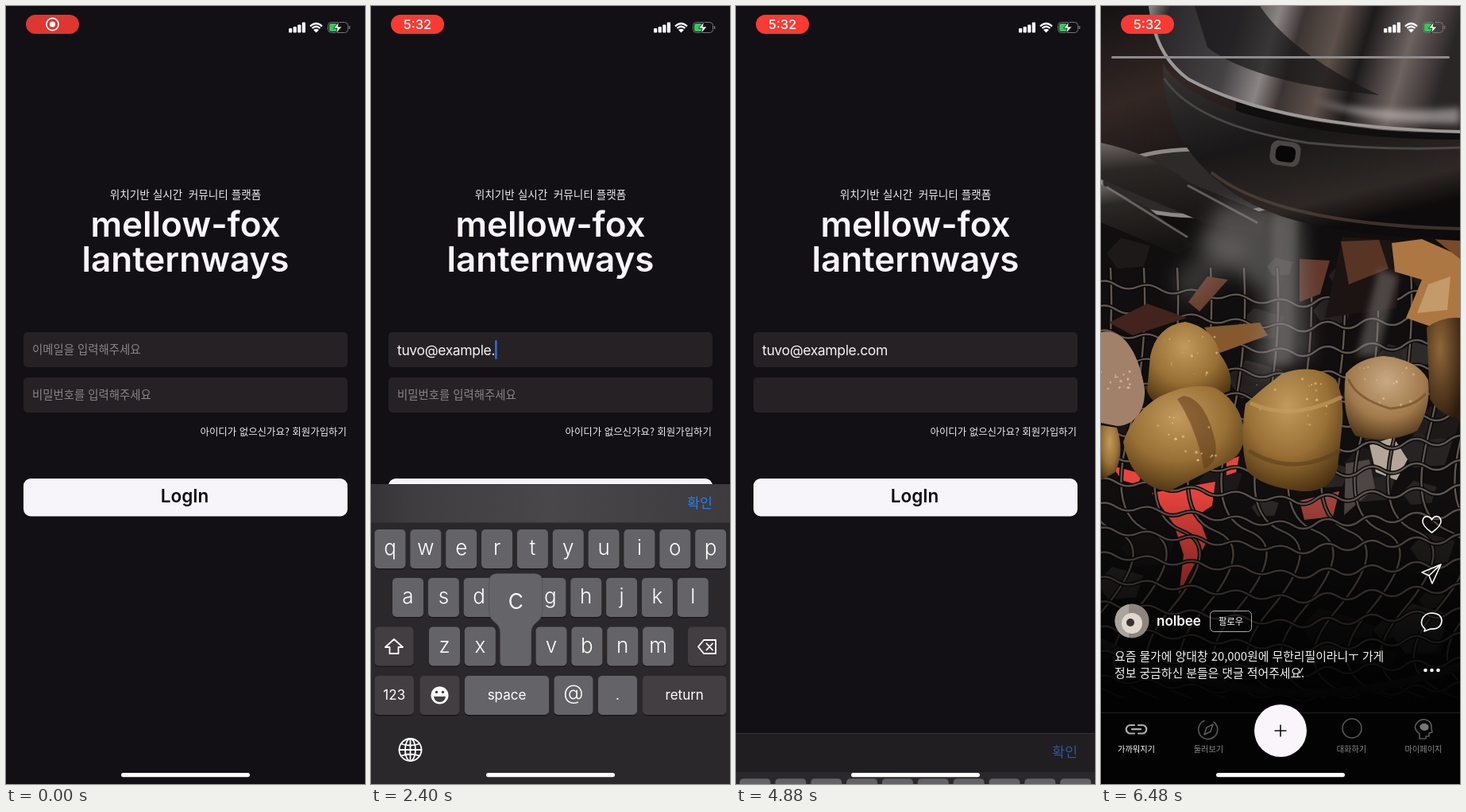
An HTML page that plays this animation: 452 by 978 pixels, repeating every 6560 ms.

```html
<!DOCTYPE html>
<html lang="ko">
<head>
<meta charset="utf-8">
<title>Login flow</title>
<style>
html, body { margin: 0; width: 100%; height: 100%; overflow: hidden; background: #121014; }
svg { display: block; width: 452px; height: 978px; }
text { font-family: Inter, "Noto Sans CJK KR", "Noto Sans CJK", sans-serif; white-space: pre; }
.ko { font-family: "Noto Sans CJK KR", "Noto Sans CJK", sans-serif; }
.mid { text-anchor: middle; }
.line { fill: none; stroke-linecap: round; stroke-linejoin: round; }
.hint { font-size: 14.4px; font-weight: 300; fill: #8a8588; }
.mail { font-size: 17.5px; letter-spacing: -.02em; fill: #f6f3f7; }
.key { font-size: 26px; font-weight: 300; fill: #fff; }
.word { font-size: 17px; fill: #fff; }
.tab { font-size: 10.2px; fill: #8b888a; }

#pill { animation: pulse 2800ms 196ms ease-in-out infinite backwards; animation-delay: -2604ms; }
#board { animation: slide 6560ms infinite; }
#glow { animation: glow 6560ms linear infinite; }
#done { animation: done 6560ms linear infinite; }
#feed { animation: feed 6560ms infinite; }
#plus { animation: settle 6560ms infinite; }
#rec { animation: rec 6560ms linear infinite; }
#clock { animation: clock 6560ms linear infinite; }
@keyframes pulse {
  0%, 100% { fill: #d4352f; }
  7% { fill: #dd3731; }
  20%, 80% { fill: #fa3a32; }
  50% { fill: #ff3b33; }
}
@keyframes slide {
  0%, 11.418% { transform: translateY(377px); animation-timing-function: cubic-bezier(.38,.7,.125,1); }
  19.04% { transform: none; }
  71.646% { transform: none; animation-timing-function: cubic-bezier(.38,.7,.125,1); }
  79.27%, 100% { transform: translateY(377px); }
}
@keyframes glow { 0%, 14.63% { opacity: 0; } 18%, 71.646% { opacity: 1; } 72.9%, 100% { opacity: 0; } }
@keyframes done { 0%, 14.63% { opacity: .65; } 18%, 71.646% { opacity: 1; } 73.5%, 100% { opacity: .65; } }
@keyframes feed { 0%, 87.8% { opacity: 0; animation-timing-function: ease; } 93.14%, 100% { opacity: 1; } }
@keyframes settle { 0%, 91.47% { transform: translateY(2px); } 93.9%, 100% { transform: none; } }
@keyframes rec { 0%, 24% { opacity: 1; } 27%, 100% { opacity: 0; } }
@keyframes clock { 0%, 24% { opacity: 0; } 27%, 100% { opacity: 1; } }
</style>
</head>
<body>
<svg viewBox="0 0 452 978" xmlns="http://www.w3.org/2000/svg">
<defs>
  <linearGradient id="barGlow">
    <stop offset="0" stop-color="#353336"/><stop offset=".12" stop-color="#3f3d40"/>
    <stop offset=".5" stop-color="#49474a"/><stop offset="1" stop-color="#3d3b3e"/>
  </linearGradient>
  <linearGradient id="dome" x2="1" y2=".12">
    <stop offset="0" stop-color="#8e8b8b"/><stop offset=".07" stop-color="#2a282a"/>
    <stop offset=".3" stop-color="#454244"/><stop offset=".42" stop-color="#8b8484"/>
    <stop offset=".5" stop-color="#3c3533"/><stop offset=".62" stop-color="#5e514b"/>
    <stop offset=".72" stop-color="#1d1a1a"/><stop offset=".86" stop-color="#6d6360"/>
    <stop offset="1" stop-color="#2a2626"/>
  </linearGradient>
  <linearGradient id="band" x2=".4" y2="1">
    <stop offset="0" stop-color="#373434"/><stop offset=".5" stop-color="#191717"/>
    <stop offset=".85" stop-color="#2e2825"/><stop offset="1" stop-color="#0d0b0b"/>
  </linearGradient>
  <linearGradient id="wall" x2=".3" y2="1">
    <stop offset="0" stop-color="#151213"/><stop offset=".6" stop-color="#332724"/><stop offset="1" stop-color="#1d1817"/>
  </linearGradient>
  <linearGradient id="tong" x2=".2" y2="1">
    <stop offset="0" stop-color="#6d6763"/><stop offset=".3" stop-color="#2b2725"/><stop offset="1" stop-color="#151212"/>
  </linearGradient>
  <linearGradient id="shade" x2="0" y2="1">
    <stop offset="0" stop-color="#000" stop-opacity="0"/><stop offset=".65" stop-color="#000" stop-opacity=".72"/><stop offset="1" stop-color="#020202"/>
  </linearGradient>
  <radialGradient id="gold" cx=".45" cy=".3" r=".75">
    <stop offset="0" stop-color="#c29a5c"/><stop offset=".55" stop-color="#986f35"/><stop offset="1" stop-color="#49300f"/>
  </radialGradient>
  <radialGradient id="pale" cx=".5" cy=".3" r=".75">
    <stop offset="0" stop-color="#c9a983"/><stop offset=".6" stop-color="#a17a4c"/><stop offset="1" stop-color="#4d3319"/>
  </radialGradient>
  <radialGradient id="brown" cx=".4" cy=".3" r=".8">
    <stop offset="0" stop-color="#8f6737"/><stop offset="1" stop-color="#2b1a0d"/>
  </radialGradient>
  <filter id="soft" x="-50%" y="-50%" width="200%" height="200%"><feGaussianBlur stdDeviation="12"/></filter>
  <filter id="haze" x="-50%" y="-50%" width="200%" height="200%"><feGaussianBlur stdDeviation="4"/></filter>
  <clipPath id="face"><circle cx="39" cy="773" r="21.5"/></clipPath>
</defs>

<g id="login">
  <rect width="452" height="978" fill="#121014"/>
  <text class="ko mid" x="226" y="242" font-size="13.6" fill="#eeeaf0">위치기반 실시간  커뮤니티 플랫폼</text>
  <g class="mid" font-size="44" font-weight="600" fill="#f9f5fb">
    <text x="226" y="290">mellow-fox</text>
    <text x="226" y="334">lanternways</text>
  </g>
  <g fill="#252124">
    <rect x="22" y="410" width="408" height="44" rx="5"/>
    <rect x="22" y="467" width="408" height="44" rx="5"/>
  </g>
  <text class="ko hint" id="mailHint" x="33" y="437">이메일을 입력해주세요</text>
  <text class="ko hint" id="passHint" x="33" y="494">비밀번호를 입력해주세요</text>
  <g id="typing"></g>
  <text class="ko" x="429" y="539.5" font-size="12.45" fill="#eeeaf0" text-anchor="end">아이디가 없으신가요? 회원가입하기</text>
  <rect x="22" y="594" width="408" height="47.5" rx="9" fill="#f8f5fa"/>
  <text class="mid" x="225" y="624" font-size="22.5" font-weight="600" fill="#0c0a0e">LogIn</text>
</g>

<g id="board">
  <g id="keys"><rect y="649" width="452" height="340" fill="#2a282b"/></g>
  <rect y="601" width="452" height="48.5" fill="#201e20"/>
  <rect id="glow" y="601" width="452" height="48.5" fill="url(#barGlow)"/>
  <path d="M0 601.5H452" stroke="#3a383b" stroke-width=".8"/>
  <text class="ko" id="done" x="398" y="631" font-size="17.4" fill="#2b7ee6">확인</text>
  <g id="pops"></g>
</g>

<g id="feed">
  <rect width="452" height="978" fill="#100e0e"/>
  <rect width="170" height="200" fill="url(#wall)"/>
  <ellipse cx="125" cy="222" rx="125" ry="42" fill="#2e2a29" stroke="#8d8885" stroke-width="5"/>
  <g id="coals"></g>
  <g fill="#e8433c">
    <path d="M14 578L52 588L46 602L26 596Z"/>
    <path d="M64 612L144 598L140 628L122 640L134 672L112 712L98 740L104 690L92 652Z"/>
    <path d="M158 572L174 566L170 586L158 590Z"/>
    <path d="M250 622L300 610L292 642L256 646Z" fill="#a8453d"/>
  </g>
  <path d="M338 552L368 542L386 570L372 596L346 586Z" fill="#b3a698"/>
  <path d="M308 575L338 570L345 606L306 640Z" fill="#4d4644"/>
  <g id="mesh" class="line"></g>
  <path d="M282 392L304 290L380 296L372 380Z" fill="#1c1412"/>
  <path d="M302 296L350 294L362 330L312 350Z" fill="#583425"/>
  <path d="M110 372L134 340L160 344L124 384Z" fill="#693c2b"/>
  <path d="M10 398L58 374L108 392L40 414Z" fill="#42231d"/>
  <path d="M250 318L288 320L276 362L250 372Z" fill="#61382a"/>
  <path d="M366 298L404 293L452 314V398L418 404L384 392L404 344L370 334Z" fill="#ad7743"/>
  <path d="M412 350L440 340L436 382L398 386Z" fill="#c49a69"/>
  <path d="M420 293H452V318Z" fill="#794a25"/>
  <path d="M130 404L200 398L210 414L150 436Z" fill="#85592d"/>
  <path d="M0 410C28 404 48 436 55 482C56 514 38 528 20 528L0 524Z" fill="#a3806a"/>
  <path d="M0 527L20 530Q30 560 18 586L0 596Z" fill="url(#gold)"/>
  <path d="M62 440Q70 402 106 397Q142 404 150 438Q168 462 162 484L104 504Q66 508 58 484Z" fill="url(#gold)"/>
  <path d="M28 548Q40 512 72 492Q112 472 144 480Q176 498 180 534Q182 566 154 576Q120 592 86 610Q40 606 28 548Z" fill="url(#gold)"/>
  <path d="M104 490Q132 494 144 548Q148 574 130 582Q120 530 96 494Z" fill="#5d3518" opacity=".5"/>
  <path d="M182 500Q204 480 228 462Q270 448 296 470Q306 490 304 524L298 580Q290 612 252 610Q200 604 184 584Q174 546 182 500Z" fill="url(#gold)"/>
  <path d="M190 500Q240 522 302 492" class="line" stroke="#c5a15f" stroke-width="5" opacity=".6"/>
  <path d="M188 560Q240 592 300 560" class="line" stroke="#5a3d1b" stroke-width="5" opacity=".55"/>
  <path d="M308 462Q326 442 356 440Q398 444 412 470Q416 504 398 534Q360 552 320 540Q302 514 308 462Z" fill="url(#pale)"/>
  <path d="M312 470Q322 494 364 506Q394 504 408 488" class="line" stroke="#735029" stroke-width="3" opacity=".7"/>
  <path d="M410 404Q430 390 452 392V520Q426 514 414 494Z" fill="url(#brown)"/>
  <g id="gleam" fill="#f0d9a8"></g>
  <path d="M0 172Q60 184 112 222L208 262L200 288L130 272L0 218Z" fill="url(#tong)"/>
  <path d="M0 224L60 254L116 300L96 312L0 272Z" fill="url(#tong)"/>
  <path d="M8 228L108 290M110 226L196 272" class="line" stroke="#8e8783" stroke-width="3" opacity=".6"/>
  <g fill="#908b8b">
    <path d="M150 250H250L262 440L194 470L206 360L120 300Z" opacity=".48" filter="url(#soft)"/>
    <path d="M216 260L248 262L240 450L212 450Z" opacity=".28" filter="url(#haze)"/>
    <path d="M350 330L374 340L348 440L322 440Z" opacity=".42" filter="url(#haze)"/>
    <path d="M90 340L150 290L190 300L110 380Z" opacity=".3" filter="url(#soft)"/>
  </g>
  <path d="M78 72C110 130 260 168 452 168V295C330 290 230 278 168 236C112 196 78 150 78 72Z" fill="url(#band)"/>
  <path d="M60 0H452V160C300 160 160 130 96 84Q66 56 60 0Z" fill="url(#dome)"/>
  <path d="M118 0H200Q240 60 350 112Q190 96 134 52Z" fill="#171617" opacity=".7"/>
  <path d="M266 118Q350 138 452 128V148Q340 150 266 118Z" fill="#d0cbc8" opacity=".55" filter="url(#haze)"/>
  <path d="M64 18Q74 66 110 92Q220 152 452 158" class="line" stroke="#9d9997" stroke-width="4"/>
  <path d="M80 92Q120 150 260 172Q360 182 452 178" class="line" stroke="#4a4646" stroke-width="3"/>
  <path d="M140 210Q220 274 452 280" class="line" stroke="#5c4b40" stroke-width="4" opacity=".6"/>
  <rect x="213" y="170" width="38" height="31" rx="10" fill="#4a4645" transform="rotate(8 232 185)"/>
  <rect x="220" y="176" width="25" height="20" rx="7" fill="#080707" transform="rotate(8 232 185)"/>
  <path d="M0 800Q220 910 452 830" class="line" stroke="#2c2828" stroke-width="10"/>
  <rect y="610" width="452" height="278" fill="url(#shade)"/>
  <rect y="887" width="452" height="91" fill="#030303"/>
  <path d="M0 888.5H452" stroke="#1d1b1c" stroke-width="1.5"/>
  <rect x="13" y="63" width="426" height="3" rx="1.5" fill="#8d8a8d"/>

  <g class="line" stroke="#fff" stroke-width="1.6">
    <path d="M416.500 662Q404 653 405 647C406 640 414 640 416.500 646C419 640 427 640 428 647Q429 653 416.500 662Z"/>
    <path d="M428 702L404 712L413 716L417 726ZM428 702L413 716"/>
    <path d="M408 783Q402 778 404 772Q407 763 417 763Q429 764 429 773Q428 784 415 783L407 786Z"/>
  </g>
  <g fill="#fff"><circle cx="408.500" cy="835" r="2.3"/><circle cx="416.500" cy="835" r="2.3"/><circle cx="424.500" cy="835" r="2.3"/></g>
  <g clip-path="url(#face)">
    <rect x="17" y="751" width="44" height="44" fill="#8d857e"/>
    <rect x="17" y="751" width="18" height="44" fill="#aaa49e"/>
    <circle cx="39" cy="776" r="13" fill="#e0d8ce"/>
    <circle cx="37" cy="775" r="5" fill="#3a3230"/>
  </g>
  <text x="70" y="779" font-size="17" font-weight="600" fill="#fff">nolbee</text>
  <rect x="137.500" y="760.500" width="52" height="26" rx="5" fill="none" stroke="#aaa6a8"/>
  <text class="ko mid" x="163.500" y="777.500" font-size="11.3" font-weight="500" fill="#fff">팔로우</text>
  <g font-size="14.85" fill="#f4f2f4">
    <text class="ko" x="17" y="823">요즘 물가에 양대창 20,000원에 무한리필이라니ㅜ 가게</text>
    <text class="ko" x="17" y="844">정보 궁금하신 분들은 댓글 적어주세요.</text>
  </g>
  <path d="M250 839L254 832" stroke="#f4f2f4" stroke-width="1.2"/>

  <g class="line" stroke="#b0adaf" stroke-width="2.2">
    <path d="M42 904H37A5 5 0 0 0 37 914.500H42M47 904H52A5 5 0 0 1 52 914.500H47M39 909.200H50"/>
  </g>
  <g class="line" stroke="#5b585a" stroke-width="1.6">
    <path d="M142 900A12 12 0 1 1 130 898.500M141 903L138 912L130 916L133 907Z"/>
    <circle cx="316" cy="908" r="12"/>
    <path d="M401 921V915Q394 910 396 904Q400 896 408 897Q417 899 416 908L417 913L413 914V918H409V921Z"/>
  </g>
  <path d="M401 905Q406 899 412 904Q414 910 408 911Q402 911 401 905Z" fill="#777476"/>
  <text class="ko mid tab" x="44.500" y="938" style="fill:#fff">가까워지기</text>
  <text class="ko mid tab" x="135.500" y="938">둘러보기</text>
  <text class="ko mid tab" x="315.500" y="938">대화하기</text>
  <text class="ko mid tab" x="406" y="938">마이페이지</text>
  <g id="plus">
    <circle cx="226" cy="911" r="33" fill="#f9f5fb"/>
    <path d="M218.500 911H233.500M226 903.500V918.500" stroke="#111" stroke-width="1.6"/>
  </g>
</g>

<g id="status">
  <rect id="pill" x="25" y="11" width="67" height="24" rx="12"/>
  <g id="rec">
    <circle cx="58.500" cy="23" r="7.6" fill="none" stroke="#fff" stroke-width="1.6"/>
    <circle cx="58.500" cy="23" r="3.6" fill="#fff"/>
  </g>
  <text id="clock" class="mid" x="58.500" y="29" font-size="16.5" font-weight="500" fill="#fff">5:32</text>
  <g fill="#fff">
    <rect x="356" y="28" width="4.200" height="5.500" rx="1"/><rect x="361.600" y="26" width="4.200" height="7.500" rx="1"/>
    <rect x="367.200" y="23.500" width="4.200" height="10" rx="1"/><rect x="372.800" y="20.500" width="4.200" height="13" rx="1"/>
    <path d="M390.500 33.500L387 30Q390.500 27.500 394 30Z"/>
  </g>
  <path d="M383 25.500Q390.500 18.500 398 25.500M385.500 28Q390.500 23.500 395.500 28" fill="none" stroke="#fff" stroke-width="2.300"/>
  <rect x="405.500" y="20.500" width="25" height="13" rx="4" fill="none" stroke="#777479"/>
  <path d="M432.500 25V29" stroke="#777479" stroke-width="1.500"/>
  <rect x="407" y="22" width="10" height="10" rx="2.500" fill="#34c759"/>
  <path d="M419.500 19.500L412.500 28H417L415.500 34.500L423 26H418Z" fill="#fff" stroke="#121014" stroke-width=".8"/>
</g>
<rect x="145" y="964" width="162" height="5.200" rx="2.600" fill="#fff"/>
</svg>

<script>
const LOOP = 6560, MAIL = 'tuvo@example.com';
const TYPE_AT = 1290, STEP = 84, HOLD = 60, FOCUS = 880, LEAVE = 2960, SECURE = 3000, CLOSE = 4700;
const $ = id => document.getElementById(id);
const sheet = document.head.appendChild(document.createElement('style'));
let count = 0;

function add(parent, markup) {
  parent.insertAdjacentHTML('beforeend', markup);
  return parent.lastElementChild;
}

// Shows a node only inside the given [from, to] spans of the loop.
function show(node, ...spans) {
  const name = 'on' + count++;
  const pct = ms => (ms / LOOP * 100).toFixed(3) + '%';
  const steps = spans.map(([a, b]) =>
    `${pct(a)}{visibility:visible}` + (b < LOOP ? `${pct(b)}{visibility:hidden}` : ''));
  const start = spans[0][0] ? '0%{visibility:hidden}' : '';
  const end = spans.at(-1)[1] < LOOP ? 'hidden' : 'visible';
  sheet.append(`@keyframes ${name}{${start}${steps.join('')}to{visibility:${end}}}`);
  node.style.animation = `${name} ${LOOP}ms step-end infinite`;
}

// Keyboard
const keys = $('keys'), places = {};
const cap = (x, y, w, fill) =>
  `<rect x="${x}" y="${y + 1.5}" width="${w}" height="49" rx="5" fill="#1a181b"/>` +
  `<rect x="${x}" y="${y}" width="${w}" height="49" rx="5" fill="${fill}"/>`;
const label = (x, y, text, type) => `<text class="mid ${type}" x="${x}" y="${y}">${text}</text>`;
const LIGHT = '#646367', DARK = '#423e41';

[['qwertyuiop', 4.5, 658], ['asdfghjkl', 27, 719], ['zxcvbnm', 73, 780.5]].forEach(([row, left, y]) =>
  [...row].forEach((ch, i) => {
    const x = left + i * 44.85;
    places[ch] = { x, y, w: 39 };
    add(keys, cap(x, y, 39, LIGHT));
    add(keys, label(x + 19.5, y + 32, ch, 'key'));
  }));
[[4.5, 780.5, 49, ''], [399, 780.5, 48.5, ''], [4.5, 842, 49.5, '123'], [61.5, 842, 50, ''],
 [118, 842, 106, 'space'], [230.5, 842, 49, '@'], [286, 842, 49, '.'], [342, 842, 105.5, 'return']
].forEach(([x, y, w, text]) => {
  places[text] = { x, y, w };
  add(keys, cap(x, y, w, /space|@|\./.test(text) ? LIGHT : DARK));
  add(keys, label(x + w / 2, y + 30, text, text === '@' ? 'key" font-size="22' : 'word'));
});
add(keys, `<g class="line" stroke="#fff" stroke-width="1.8">
  <path d="M29 796L40 806H34.500V814H23.500V806H18Z"/>
  <path d="M412 805.500L419 797H434V814H419ZM422.500 801.500L430 809.500M430 801.500L422.500 809.500"/>
  <circle cx="49.500" cy="935" r="14"/><ellipse cx="49.500" cy="935" rx="6.500" ry="14"/>
  <path d="M35.500 935H63.500M49.500 921V949M38 927.500Q49.500 931.500 61 927.500M38 942.500Q49.500 938.500 61 942.500"/></g>`);
add(keys, `<g><circle cx="86.500" cy="866.500" r="11" fill="#fff"/>
  <path d="M79 868H94Q93 875 86.500 875Q80 875 79 868Z" fill="${DARK}"/>
  <circle cx="82.500" cy="862.500" r="1.700" fill="${DARK}"/><circle cx="90.500" cy="862.500" r="1.700" fill="${DARK}"/></g>`);
show(keys, [0, SECURE], [CLOSE, LOOP]);

// Enlarged bubble above a pressed key
function bubble(ch, { x, y, w }) {
  const l = Math.max(1, x - 14), r = Math.min(451, x + w + 14), e = x + w;
  return `<g><path fill="#656468" stroke="#4c4a4e" stroke-width=".6" d="M${x + 5} ${y + 49}q-5 0-5-5V${y + 8}
    C${x} ${y - 8} ${l} ${y - 4} ${l} ${y - 20}V${y - 57}q0-10 10-10H${r - 10}q10 0 10 10V${y - 20}
    C${r} ${y - 4} ${e} ${y - 8} ${e} ${y + 8}V${y + 44}q0 5-5 5Z"/>
    <text class="mid" x="${(l + r) / 2}" y="${y - 23}" font-size="36" font-weight="300" fill="#fff">${ch}</text></g>`;
}

// Typing
const typing = $('typing'), pops = $('pops');
const typedAt = i => TYPE_AT + i * STEP + HOLD;
for (let i = 0; i <= MAIL.length; i++) {
  const from = i ? typedAt(i - 1) : FOCUS;
  const to = i < MAIL.length ? typedAt(i) : LEAVE;
  const line = add(typing, `<g><text class="mail" x="33" y="439">${MAIL.slice(0, i)}</text></g>`);
  const end = 33 + (i ? line.firstChild.getComputedTextLength() : 0);
  add(line, `<rect x="${end}" y="420" width="2.500" height="24" rx="1" fill="#2f6fd0"/>`);
  show(line, [from, to]);
}
[...MAIL].forEach((ch, i) => {
  const p = places[ch];
  const pop = add(pops, /[a-z]/.test(ch) ? bubble(ch, p)
    : `<g>${cap(p.x, p.y, p.w, DARK)}${label(p.x + p.w / 2, p.y + 30, ch, 'key')}</g>`);
  show(pop, [typedAt(i) - HOLD, typedAt(i)]);
});
show(add(typing, `<text class="mail" x="33" y="439">${MAIL}</text>`), [LEAVE, LOOP]);
show($('mailHint'), [0, typedAt(0)]);
show($('passHint'), [0, SECURE]);

// Grill texture
let seed = 7;
const rand = (a, b) => a + (b - a) * ((seed = seed * 16807 % 2147483647) / 2147483647);
for (let i = 0; i < 46; i++) {
  const x = rand(0, 452), y = rand(310, 850), s = rand(14, 36), c = rand(20, 46) | 0;
  add($('coals'), `<path d="M${x - s} ${y}L${x - s / 3} ${y - s * .7}L${x + s} ${y - s / 3}L${x + s * .7} ${y + s * .6}L${x - s / 2} ${y + s * .7}Z" fill="rgb(${c + 2},${c - 1},${c - 2})"/>`);
}
const wire = (d, w) => {
  add($('mesh'), `<path d="${d}" stroke="#0b0909" stroke-width="${w + 3}"/>`);
  add($('mesh'), `<path d="${d}" stroke="#5f5650" stroke-width="${w}"/>`);
};
for (let i = 0; i < 16; i++) {
  const x = i * 42 - 90;
  wire(`M${x + 60} 330Q${x + 66} 440 ${x + 40} 540T${x + 66} 660T${x + 50} 760T${x + 78} 870`, 2.4);
}
for (let i = 0; i < 17; i++) {
  const y = 350 + i * 31;
  let d = `M-10 ${y}q14 -9 28 0`;
  for (let k = 0; k < 16; k++) d += `t28 ${k < 8 ? 3 : -2}`;
  wire(d, 2.4);
}
[[110, 440, 36], [100, 545, 48], [242, 500, 46], [358, 478, 36], [20, 470, 22]].forEach(([x, y, r]) => {
  for (let i = 0; i < 16; i++)
    add($('gleam'), `<circle cx="${x + rand(-r, r)}" cy="${y + rand(-r, r) * .7}" r="${rand(.6, 1.8)}" opacity="${rand(.25, .7)}"/>`);
});
</script>
</body>
</html>
```
